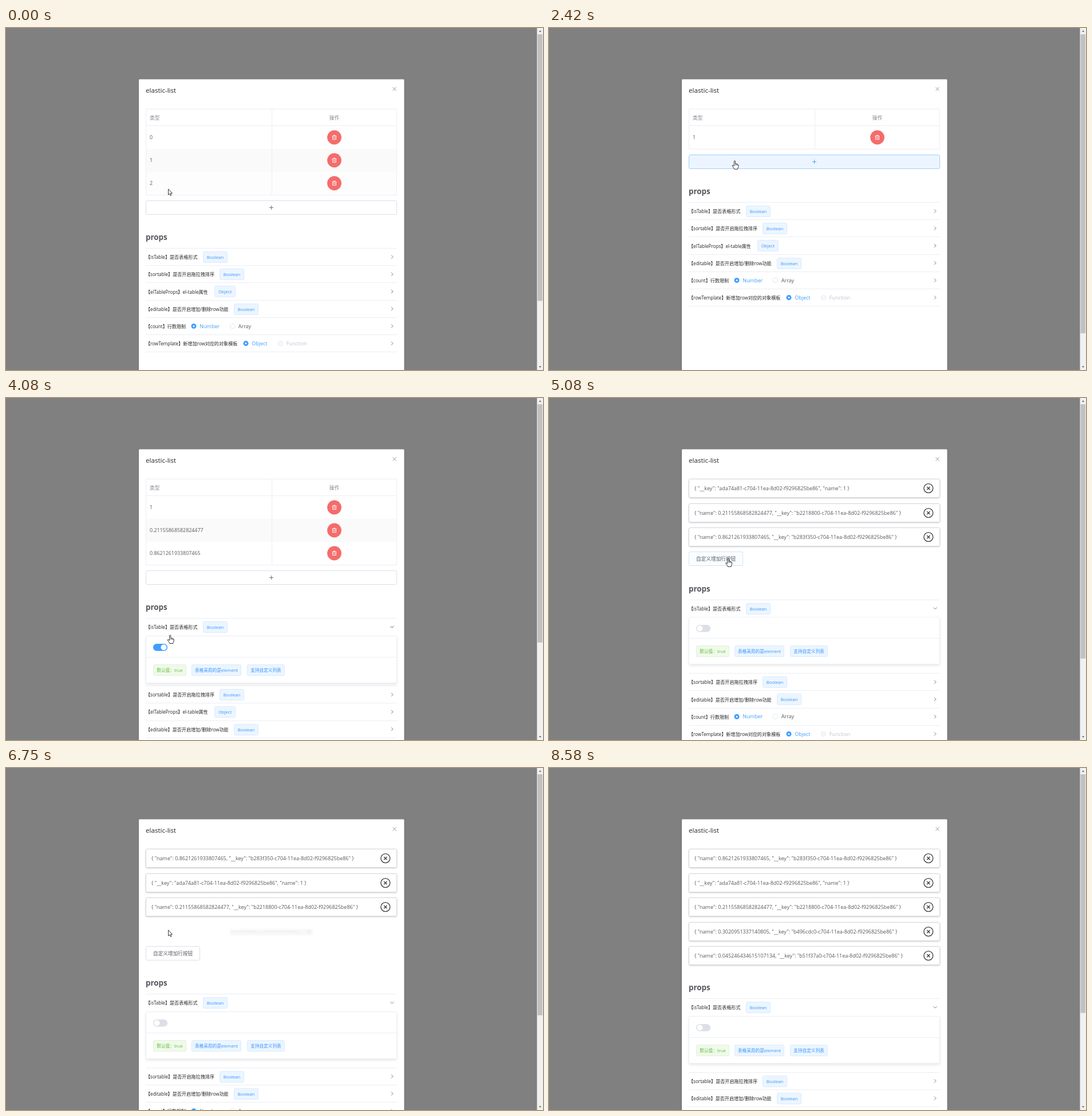
These frames come from a looping animation (938x597 px, 9160 ms). An HTML page with a canvas:

```html
<!DOCTYPE html>
<html lang="zh-CN">
<head>
<meta charset="utf-8">
<title>elastic-list</title>
<style>
html, body { margin: 0; width: 100%; height: 100%; overflow: hidden; background: #808080; }
canvas { display: block; }
</style>
</head>
<body>
<canvas id="stage" width="938" height="597"></canvas>
<script>
const ctx = document.getElementById('stage').getContext('2d');
const LOOP = 9160, FPS = 12;
const FONT = '"Open Sans", "Noto Sans CJK SC", "Noto Sans CJK", sans-serif';
const BLUE = '#409eff', INK = '#26272a', TEXT = '#585a5f', LINE = '#ebeef5', BORDER = '#dcdfe6';
const OPEN_AT = 3900, LIST_AT = 4670, MAX_ROWS = 5;

// Row data: value and first part of the key
const ITEMS = [
  ['0', ''], ['1', 'ada74a81'], ['2', ''],
  ['0.21155868582824477', 'b2218800'], ['0.8621261933807465', 'b283f350'],
  ['0.3020951337140805', 'b496cdc0'], ['0.045246434615107134', 'b51f37a0']
];
const ORDERS = [
  [0, '012'], [360, '021'], [560, '201'], [1650, '01'], [2000, '1'], [2530, '13'],
  [3170, '134'], [5830, '143'], [5853, '413'], [6690, '4135'], [7570, '41356']
];
const DRAGS = [
  { from: 150, to: 760, id: 2, x: 283, y: 279 },
  { from: 5600, to: 6200, id: 4, x: 313, y: 240 }
];
const PATH = [
  [0, 283, 281], [120, 283, 281], [700, 268, 198], [800, 268, 198], [1400, 571, 198],
  [2050, 571, 198], [2450, 302, 235], [2600, 302, 236], [2850, 302, 278], [3320, 302, 278],
  [3800, 300, 399], [3950, 300, 399], [4270, 268, 435], [4700, 268, 435], [5083, 313, 280],
  [5420, 313, 240], [5600, 313, 240], [6000, 323, 158], [6200, 322, 156], [6550, 284, 282],
  [6780, 283, 283], [7100, 282, 320], [7650, 282, 320], [8500, 77, 600]
];
const SECTIONS = [
  { name: '【isTable】是否表格形式', tag: 'Boolean', x: 344 },
  { name: '【sortable】是否开启拖拉拽排序', tag: 'Boolean', x: 373 },
  { name: '【elTableProps】el-table属性', tag: 'Object', x: 364, tableOnly: true },
  { name: '【editable】是否开启增加/删除row功能', tag: 'Boolean', x: 398 },
  { name: '【count】行数限制', radios: [[328, 'Number', 'on'], [395.5, 'Array', 'off']] },
  { name: '【rowTemplate】新增加row对应的对象模板', radios: [[419, 'Object', 'on'], [479.5, 'Function', 'disabled']] }
];

const clamp = v => Math.max(0, Math.min(1, v));
const mix = (a, b, p) => a + (b - a) * p;

// CSS "ease": cubic-bezier(.25, .1, .25, 1)
function ease(p) {
  if (p <= 0 || p >= 1) return clamp(p);
  const curve = (a, b, s) => 3 * a * s * (1 - s) ** 2 + 3 * b * s * s * (1 - s) + s ** 3;
  let lo = 0, hi = 1;
  for (let i = 0; i < 20; i++) {
    const m = (lo + hi) / 2;
    if (curve(.25, .25, m) < p) lo = m; else hi = m;
  }
  return curve(.1, 1, lo);
}

function cursorAt(t) {
  if (t < 0) return [-50, -50];
  const i = PATH.findIndex(k => k[0] > t);
  if (i < 0) return [77, 700];
  const a = PATH[i - 1], b = PATH[i], p = (t - a[0]) / (b[0] - a[0]);
  return [mix(a[1], b[1], p), mix(a[2], b[2], p)];
}

const inside = ([px, py], x, y, w, h) => px >= x && px <= x + w && py >= y && py <= y + h;

// Share of the last moments the pointer spent in the box: a short fade
function hover(t, ...rect) {
  let n = 0;
  for (let k = 0; k < 4; k++) n += inside(cursorAt(t - 40 * k), ...rect);
  return n / 4;
}

function text(s, x, cy, size, color, weight = 400, align = 'left') {
  ctx.font = `${weight} ${size}px ${FONT}`;
  ctx.textAlign = align;
  ctx.fillStyle = color;
  ctx.fillText(s, x, Math.round(cy + size * .36));
}

function rect(x, y, w, h, color) {
  ctx.fillStyle = color;
  ctx.fillRect(x, y, w, h);
}

function box(x, y, w, h, r, fill, stroke) {
  ctx.beginPath();
  ctx.roundRect(x + .5, y + .5, w - 1, h - 1, r);
  if (fill) { ctx.fillStyle = fill; ctx.fill(); }
  if (stroke) { ctx.strokeStyle = stroke; ctx.lineWidth = 1; ctx.stroke(); }
}

function disc(x, y, r, fill, stroke, width = 1) {
  ctx.beginPath();
  ctx.arc(x, y, r, 0, Math.PI * 2);
  if (fill) { ctx.fillStyle = fill; ctx.fill(); }
  if (stroke) { ctx.strokeStyle = stroke; ctx.lineWidth = width; ctx.stroke(); }
}

function strokes(color, width, ...lines) {
  ctx.beginPath();
  for (const pts of lines)
    for (let i = 0; i < pts.length; i += 2)
      ctx[i ? 'lineTo' : 'moveTo'](pts[i], pts[i + 1]);
  ctx.strokeStyle = color;
  ctx.lineWidth = width;
  ctx.stroke();
}

const cross = (x, y, r, color, w) =>
  strokes(color, w, [x - r, y - r, x + r, y + r], [x - r, y + r, x + r, y - r]);

function shadow(color, blur, dy) {
  ctx.shadowColor = color;
  ctx.shadowBlur = blur;
  ctx.shadowOffsetY = dy;
}

function tag(s, x, cy, w, green) {
  const c = green ? ['#f0f9eb', '#e1f3d8', '#5fbf31'] : ['#ecf5ff', '#d9ecff', '#3596fb'];
  box(x, Math.round(cy - 10), w, 20, 2, c[0], c[1]);
  text(s, x + w / 2, cy + .3, 7.65, c[2], 400, 'center');
}

function radio(x, cy, label, state) {
  if (state === 'on') {
    disc(x, cy, 4.5, BLUE);
    disc(x, cy, 1.5, '#fff');
  } else {
    disc(x, cy, 4.2, state === 'off' ? '#fff' : '#f5f7fa', state === 'off' ? BORDER : '#e4e7ed', .8);
  }
  text(label, x + 10.3, cy, 8.97, { on: BLUE, off: TEXT, disabled: '#c0c4cc' }[state]);
}

function trash(x, y) {
  disc(x, y, 12.4, inside(pointer, x - 11, y - 11, 22, 22) ? '#f78989' : '#f56c6c');
  ctx.save();
  ctx.translate(x, y);
  strokes('#fff', .9, [-4, -2.3, 4, -2.3], [-1.5, -2.5, -1.5, -3.8, 1.5, -3.8, 1.5, -2.5],
    [-3, -2.3, -3, 3.6, 3, 3.6, 3, -2.3], [-1, -.6, -1, 2], [1, -.6, 1, 2]);
  ctx.restore();
}

// Reordered rows glide on from wherever they were; added and removed rows jump
function slotAt(i, id, t) {
  const [start, ids] = ORDERS[i], n = ids.indexOf(id);
  if (!i || ORDERS[i - 1][1].length !== ids.length) return n;
  const p = 1 - (1 - clamp((t - start) / 200)) ** 2;
  return mix(slotAt(i - 1, id, start), n, p);
}

function orderAt(t) {
  const i = ORDERS.findLastIndex(o => o[0] <= t);
  return [...ORDERS[i][1]].map(id => ({ id: +id, slot: slotAt(i, id, t) }));
}

function tableView(t, rows) {
  const n = rows.length, bottom = 171 + 40 * n;
  text('类型', 251, 156.5, 8.7, '#85888f', 500);
  text('操作', 573.5, 156.5, 8.7, '#85888f', 500, 'center');
  rows.forEach(({ id, slot }, i) => {
    const y = 171 + 40 * slot;
    rect(245, y, 438, 40, i % 2 ? '#fafafa' : '#fff');
    ctx.globalAlpha = hover(t, 244, y, 439, 40);
    rect(245, y, 438, 40, '#f5f7fa');
    ctx.globalAlpha = 1;
    text(ITEMS[id][0], 251, y + 20, 8.87, TEXT);
    trash(573.5, y + 20);
    rect(244, Math.round(y + 39.5), 439, 1, LINE);
  });
  rect(244, 170, 439, 1, LINE);
  rect(464, 141, 1, bottom - 141, LINE);
  box(244, 141, 439, bottom - 140, 0, null, LINE);

  const y = bottom + 10, focused = t >= 2530 && t < OPEN_AT;
  const lit = focused || hover(t, 244, y, 439, 25) > .5;
  box(244, y, 439, 25, 2.5, lit ? '#ecf5ff' : '#fff', lit ? '#a0cfff' : BORDER);
  strokes(lit ? '#5b9fdc' : '#6b7480', 1, [460, y + 12.5, 467, y + 12.5], [463.5, y + 9, 463.5, y + 16]);
}

function json(id) {
  const [name, key] = ITEMS[id], uuid = `"__key": "${key}-c704-11ea-8d02-f9296825be86"`;
  return id === 1 ? `{ ${uuid}, "name": ${name} }` : `{ "name": ${name}, ${uuid} }`;
}

function card(t, id, y) {
  const added = { 5: 6690, 6: 7570 }[id], age = added ? (t - added) / 1000 : 1;
  const scale = mix(.3, 1, ease(age));
  ctx.save();
  ctx.globalAlpha = ease(age * 2);
  ctx.translate(463.5, y + 16.5);
  ctx.scale(scale, scale);
  ctx.translate(-463.5, -16.5);
  shadow('rgba(0,0,0,.28)', 3, 1);
  box(244, 0, 439, 33, 2, '#fff');
  shadow('transparent', 0, 0);
  box(244, 0, 439, 33, 2, null, '#d6d8dd');
  text(json(id), 254, 16.5, 8.98, TEXT);
  disc(662.8, 16.6, 8, null, '#3e4044', 1.35);
  cross(662.8, 16.6, 2.6, '#3e4044', 1.45);
  ctx.restore();
}

function listView(t, rows) {
  const n = rows.length;
  rows.forEach(({ id, slot }) => card(t, id, Math.round(141 + 42.5 * slot)));
  if (n >= MAX_ROWS) return;
  const y = Math.round(141 + 42.5 * n - .2), p = hover(t, 244, y, 95, 25);
  box(244, y, 95, 25, 2.5, '#fff', BORDER);
  ctx.globalAlpha = p;
  box(244, y, 95, 25, 2.5, '#ecf5ff', '#c6e2ff');
  ctx.globalAlpha = 1;
  text('自定义增加行按钮', 257, y + 12.5, 8.67, p > .5 ? BLUE : TEXT);
}

function chevron(y, turn) {
  ctx.save();
  ctx.translate(674.5, y);
  ctx.rotate(turn * Math.PI / 2);
  strokes('#6a6c70', .9, [-1.5, -3, 1.5, 0, -1.5, 3]);
  ctx.restore();
}

function panel(y, height, list) {
  ctx.save();
  ctx.beginPath();
  ctx.rect(232, y, 463, height);
  ctx.clip();
  y = Math.round(y);
  shadow('rgba(0,0,0,.1)', 5, 2.5);
  box(244, y, 439, 83, 2, '#fff');
  shadow('transparent', 0, 0);
  box(244, y, 439, 83, 2, null, LINE);
  rect(244, y + 37, 439, 1, LINE);
  ctx.beginPath();
  ctx.roundRect(257, y + 14, 25, 12.5, 6.25);
  ctx.fillStyle = list ? '#dcdfe6' : BLUE;
  ctx.fill();
  disc(list ? 263.5 : 275.5, y + 20.2, 5, '#fff');
  tag('默认值：true', 257, y + 60, 58, true);
  tag('表格采用的是element', 324, y + 60, 87);
  tag('支持自定义列表', 421, y + 60, 66);
  ctx.restore();
}

function props(head, list, open) {
  text('props', 244, head - .5, 13.4, '#55585e', 700);
  let y = head + 18.5;
  for (const s of SECTIONS) {
    if (s.tableOnly && list) continue;
    const first = s === SECTIONS[0], cy = y + 15.5;
    rect(244, Math.floor(y), 439, 1, LINE);
    text(s.name, 244, cy + .2, 8.1, INK);
    if (s.tag) tag(s.tag, s.x, cy, s.tag === 'Object' ? 37 : 43);
    else for (const [x, label, state] of s.radios) radio(x, cy - .4, label, state);
    chevron(cy - .4, first ? open : 0);
    y += 30.2;
    if (first && open) {
      panel(y, 98.5 * open, list);
      y += 98.5 * open;
    }
  }
  rect(244, Math.floor(y), 439, 1, LINE);
  return y;
}

function triangle(y, dir) {
  ctx.beginPath();
  ctx.moveTo(930.8, y + dir);
  ctx.lineTo(935.2, y + dir);
  ctx.lineTo(933, y - 1.3 * dir);
  ctx.fillStyle = '#505050';
  ctx.fill();
}

function scrollbar(pageHeight) {
  rect(927.5, 0, 10.5, 597, '#f1f1f1');
  rect(928.5, 11, 8.5, 575 * 597 / pageHeight, '#c1c1c1');
  triangle(5.5, 1);
  triangle(591.5, -1);
}

// Drag image that fades away from the pointer
function ghost(d, list) {
  const dx = pointer[0] - d.x, dy = pointer[1] - d.y;
  const tint = ctx.createRadialGradient(...pointer, 0, ...pointer, 340);
  tint.addColorStop(0, 'rgba(96,98,102,.5)');
  tint.addColorStop(1, 'rgba(96,98,102,.08)');
  ctx.save();
  ctx.translate(dx, dy);
  if (list) {
    ctx.globalAlpha = .3;
    box(244, 226, 439, 33, 2, 'rgba(255,255,255,.6)', tint);
    ctx.globalAlpha = 1;
    text(json(d.id), 254, 242.5, 8.98, tint);
  } else {
    ctx.globalAlpha = .4;
    rect(244, 251, 439, 40, '#f5f7fa');
    text(ITEMS[d.id][0], 251, 271, 8.87, tint);
    disc(573.5, 271, 12.4, 'rgba(245,108,108,.5)');
  }
  ctx.restore();
}

function shape(pts) {
  ctx.beginPath();
  for (let i = 0; i < pts.length; i += 2) ctx.lineTo(pts[i], pts[i + 1]);
  ctx.closePath();
  ctx.fillStyle = '#fff';
  ctx.fill();
  ctx.strokeStyle = '#222';
  ctx.lineWidth = .9;
  ctx.stroke();
}

function drawPointer(kind) {
  ctx.save();
  ctx.translate(...pointer);
  ctx.lineJoin = 'round';
  if (kind === 'hand') {
    shape([-1, .3, 0, -.3, 1, .3, 1.2, 5, 3, 5, 3.3, 5.8, 5, 5.9, 5.3, 6.7, 6.3, 7, 6.6, 8,
      6.3, 11, 5.2, 13, 5.2, 14.5, -.8, 14.5, -1.2, 13, -4.2, 9, -4, 7.7, -3, 7.6, -1.2, 9.2]);
    strokes('#222', .7, [1.2, 5, 1.2, 8], [3.2, 5.8, 3.2, 8], [5.1, 6.5, 5.1, 8]);
  } else {
    shape([.5, 0, .5, 10.2, 2.8, 8.2, 4.3, 11.6, 5.9, 10.9, 4.4, 7.6, 7.3, 7.4]);
    if (kind === 'drag') box(1, 9, 9, 7, 1, '#fff', '#333');
  }
  ctx.restore();
}

let pointer;

function draw(t) {
  pointer = cursorAt(t);
  const list = t >= LIST_AT, rows = orderAt(t), n = rows.length;
  const open = ease((t - OPEN_AT) / 300);
  const top = list ? 141 + 42.5 * n : 181 + 40 * n;
  const head = top + (n < MAX_ROWS ? 65 : 30.5);

  rect(0, 0, 938, 597, '#808080');
  shadow('rgba(0,0,0,.15)', 3, 1);
  ctx.beginPath();
  ctx.roundRect(232, 89.5, 463.5, 530, 1.5);
  ctx.fillStyle = '#fff';
  ctx.fill();
  shadow('transparent', 0, 0);
  text('elastic-list', 244, 109, 11.6, INK);
  cross(678.5, 106.5, 3, '#85888e', .9);

  (list ? listView : tableView)(t, rows);
  scrollbar(props(head, list, open) + 172);

  const drag = DRAGS.find(d => t >= d.from && t < d.to);
  if (drag) ghost(drag, list);

  const line = head + 18.5;
  const clickable = inside(pointer, 244, line, 439, 30)
    || (n < MAX_ROWS && inside(pointer, 244, top, list ? 95 : 439, 25))
    || (open && inside(pointer, 257, line + 44, 25, 13))
    || (!list && rows.some((r, i) => inside(pointer, 562, 179 + 40 * i, 23, 24)));
  drawPointer(drag ? 'drag' : clickable ? 'hand' : 'arrow');
}

const start = performance.now();
function tick() {
  const t = (performance.now() - start) % LOOP;
  draw(Math.floor((t + 4) * FPS / 1000) * 1000 / FPS);
  requestAnimationFrame(tick);
}
tick();
</script>
</body>
</html>
```
